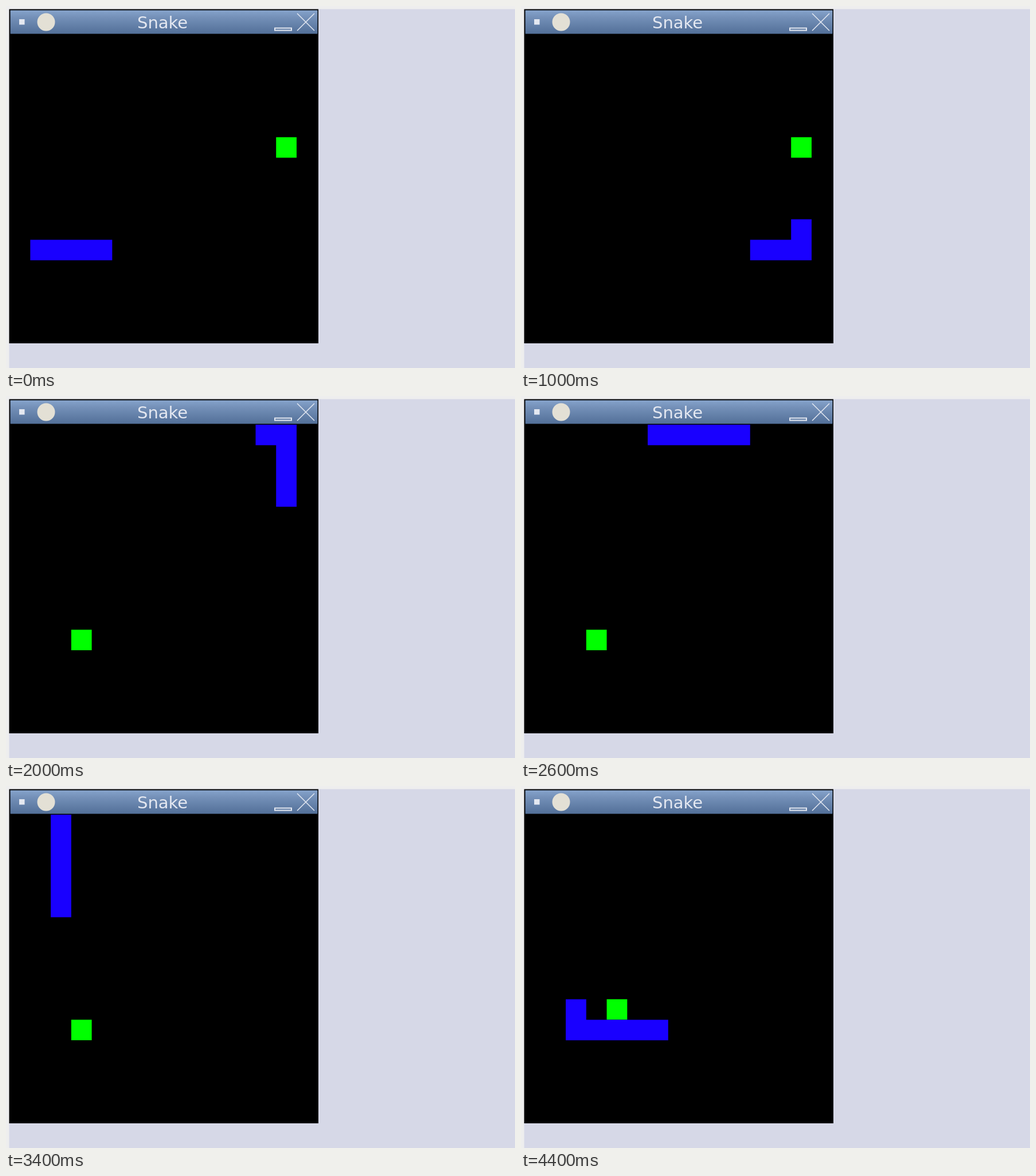
Write an HTML page that moves like this. It is 888x631 px and loops after 4.6 s.

```html
<!DOCTYPE html>
<html lang="en">
<head>
<meta charset="utf-8">
<title>Snake</title>
<style>
  html, body { margin: 0; width: 100%; height: 100%; overflow: hidden; background: #eeeeee; }
  svg { display: block; width: 888px; height: 631px; }
  .title { font: 29px "DejaVu Sans", sans-serif; fill: #e4e8f1; }
  .controls { fill: none; stroke: #e4e8f1; }
</style>
</head>
<body>
<svg viewBox="0 0 888 631">
  <defs>
    <linearGradient id="bar" x2="0" y2="1">
      <stop offset="0" stop-color="#86a3cb"/>
      <stop offset=".3" stop-color="#7490b8"/>
      <stop offset="1" stop-color="#526f98"/>
    </linearGradient>
  </defs>
  <rect x="5.5" y="5.5" width="883" height="626" fill="#d6d8e7"/>
  <rect x="5.5" y="5.5" width="539.5" height="582.5"/>
  <rect x="7.5" y="7.5" width="536" height="41" fill="url(#bar)"/>
  <rect x="23" y="23" width="9.5" height="9.5" fill="#e4e8f1"/>
  <circle cx="70" cy="28" r="15.5" fill="#e3e0d5"/>
  <text class="title" x="229" y="39">Snake</text>
  <g class="controls">
    <rect x="469" y="38.5" width="29" height="4" stroke-width="2"/>
    <path d="M508 13L538 43M538 13L508 43" stroke-width="1.5"/>
  </g>
  <!-- Board: one unit per cell -->
  <g transform="translate(6.6 50) scale(35.74)">
    <rect id="food" width="1" height="1" fill="#00ff00"/>
    <path id="snake" d="M1 10.5H13.5V.5H2.5V10.5H7" fill="none" stroke="#1900ff"/>
  </g>
</svg>
<script>
  const STEP_MS = 200, STEPS = 23;
  const snake = document.getElementById("snake");
  const food = document.getElementById("food");
  const start = performance.now();

  function draw() {
    const step = Math.floor((performance.now() - start) / STEP_MS) % STEPS;
    const head = 4 + 2 * step;
    const length = step < 8 ? 4 : step < 21 ? 5 : 6;
    const [x, y] = step < 7 ? [13, 5] : step < 21 ? [3, 10] : [4, 9];

    snake.setAttribute("stroke-dasharray", `${length} 100`);
    snake.setAttribute("stroke-dashoffset", length - head);
    food.setAttribute("x", x);
    food.setAttribute("y", y);
    requestAnimationFrame(draw);
  }
  draw();
</script>
</body>
</html>
```
